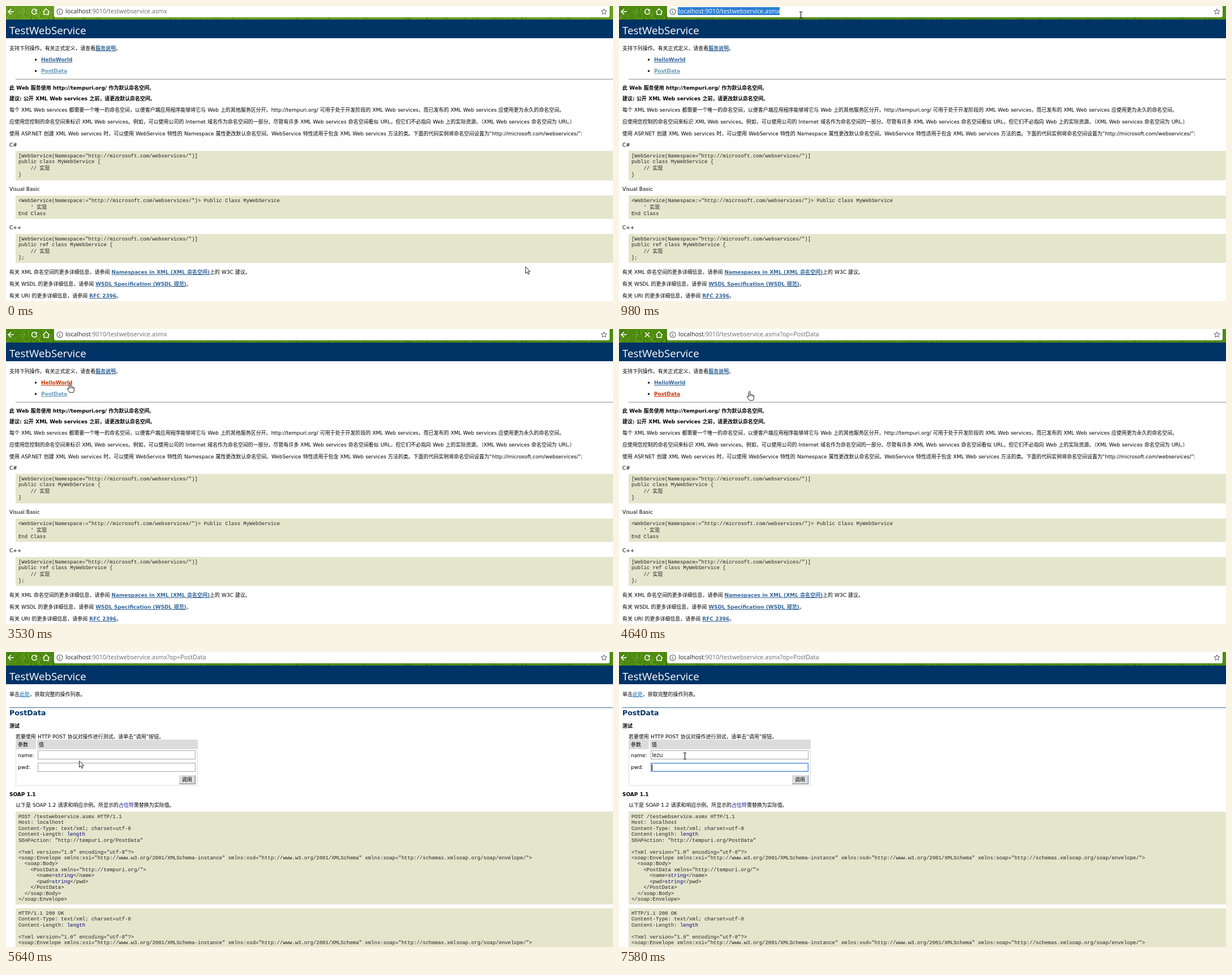
Animation of 1073 by 522 pixels, one loop 8000 ms. Source, as an HTML page with a canvas:

```html
<!DOCTYPE html>
<html lang="zh-CN">
<head>
<meta charset="utf-8">
<title>TestWebService</title>
<style>
html, body { margin: 0; width: 100%; height: 100%; overflow: hidden; background: #fff; }
canvas { display: block; }
</style>
</head>
<body>
<canvas id="stage" width="1073" height="522"></canvas>
<script>
const W = 1073, H = 522, LOOP = 8000;
const ctx = document.getElementById('stage').getContext('2d');

const SANS = "'DejaVu Sans','Noto Sans CJK SC',sans-serif";
const BODY = '8.96px ' + SANS, BOLD = 'bold ' + BODY, HEAD = 'bold 12.5px ' + SANS;
const MONO = "8.96px 'Liberation Mono','Noto Sans CJK SC',monospace";
const UI = "'Open Sans','Noto Sans',sans-serif";
const LINK = '#336699', VISITED = '#6699bb', HOVER = '#cc3300', NAVY = '#000080', HEADER = '#003366';

// Each move: first step, last step, number of steps, end position.
const MOVES = [
  [70, 130, 2, 444, 143], [280, 980, 10, 321, 16], [2230, 2610, 6, 291, 90],
  [2760, 2840, 2, 300, 80], [2915, 3070, 3, 226, 16], [3220, 3530, 5, 113, 96],
  [3605, 3760, 3, 90, 117], [4310, 4640, 5, 231, 110], [4710, 4710, 1, 231, 109],
  [5110, 5490, 6, 135, 196], [5567, 5720, 3, 116, 184]
];
const TYPED = 'lezu', KEYS = [6650, 6810, 6960, 7120];

const between = (t, a, b) => t >= a && t < b;

function rect(x, y, w, h, color) {
  ctx.fillStyle = color;
  ctx.fillRect(x, y, w, h);
}

function frame(x, y, w, h, color) {
  ctx.strokeStyle = color;
  ctx.lineWidth = 1;
  ctx.strokeRect(x + .5, y + .5, w - 1, h - 1);
}

function path(d, x, y, fill, stroke, width = 1) {
  ctx.save();
  ctx.translate(x, y);
  const p = new Path2D(d);
  if (fill) { ctx.fillStyle = fill; ctx.fill(p); }
  if (stroke) { ctx.strokeStyle = stroke; ctx.lineWidth = width; ctx.stroke(p); }
  ctx.restore();
}

// Text between ~ signs takes the mark colour; marks other than NAVY are links.
function write(s, x, y, { font = BODY, color = '#000', mark = LINK } = {}) {
  s.split('~').forEach((part, i) => {
    const marked = i % 2, link = marked && mark !== NAVY;
    ctx.font = link ? BOLD : font;
    ctx.wordSpacing = font === BODY || font === BOLD ? '.3px' : '0px';
    ctx.fillStyle = marked ? mark : color;
    ctx.fillText(part, x, y);
    const w = ctx.measureText(part).width;
    if (link) ctx.fillRect(x, y + 1, w, 1);
    x += w;
  });
  return x;
}

function code(top, height, text) {
  rect(17, top, W, height, '#e5e5cc');
  rect(17, top, W, 1, '#efefe0');
  rect(17, top + height - 1, W, 1, '#efefe0');
  let y = top + 12;
  text.split('\n').forEach((line, i) => {
    const cjk = /[\u4e00-\u9fff]/.test(line);
    if (cjk) y += 1.6;
    write(line, 22, Math.round(y), { font: MONO, color: '#222', mark: NAVY });
    y += cjk ? 10.9 : 10.43;
  });
}

function grass(focused) {
  rect(0, 0, W, 24, focused ? '#4e8c10' : '#689f20');
  let seed = 7;
  const rnd = () => (seed = seed * 16807 % 2147483647) / 2147483647;
  for (let i = 0; i < 420; i++) {
    const x = i < 160 ? rnd() * 86 : rnd() * W;
    const y = i < 160 ? rnd() * 24 : 19 + rnd() * 5;
    rect(x, y, 1 + rnd() * 2, 2 + rnd() * 5, rnd() < .5 ? 'rgba(35,85,0,.22)' : 'rgba(135,190,40,.2)');
  }
}

function toolbar(t) {
  const selected = between(t, 830, 1520);
  const loading = between(t, 1520, 1990) || between(t, 4310, 4800);
  grass(t >= 830);
  ctx.fillStyle = '#fff';
  ctx.beginPath();
  ctx.roundRect(85, -4, 982, 24, 3);
  ctx.fill();
  path('M10 0H0M5 -5L0 0L5 5', 4, 10, null, '#fff', 1.7);
  path('M0 0H10M5 -5L10 0L5 5', 24, 10, null, 'rgba(255,255,255,.16)', 1.6);
  if (loading) path('M-4 -4L4 4M4 -4L-4 4', 50, 10, null, '#fff', 1.6);
  else {
    path('M3.5 -2.8A4.5 4.5 0 1 0 4.4 1', 50, 10, null, '#fff', 1.6);
    path('M5 -5V-.5H.5Z', 50, 10, '#fff');
  }
  path('M-6 .5L0 -5L6 .5M-4 0V5H4V0', 71, 10, null, '#fff', 1.5);
  path('M5 0A5 5 0 1 1 -5 0A5 5 0 1 1 5 0M0 -1V3M0 -3V-1.8', 95, 10, null, '#555', 1.1);
  path('M0 -5L1.5 -1.7L5 -1.4L2.3 1L3.1 4.5L0 2.6L-3.1 4.5L-2.3 1L-5 -1.4L-1.5 -1.7Z', 1057, 10, null, '#555570');

  const url = { font: '10.7px ' + UI, color: selected ? '#fff' : '#222', mark: NAVY };
  if (selected) rect(104, 2, 180, 14, '#2b7fd4');
  const x = write('localhost', 105, 13, url);
  url.color = selected ? '#fff' : '#686868';
  write(':9010/testwebservice.asmx' + (t >= 4310 ? '?op=PostData' : ''), x, 13, url);

  rect(0, 24, W, 33, HEADER);
  write('TestWebService', 6, 50, { font: '18.7px ' + UI, color: '#fff' });
}

function listPage(helloHover, postHover) {
  write('支持下列操作。有关正式定义，请查看~服务说明~。', 6, 78);
  [95, 115].forEach(y => path('M1.7 0A1.7 1.7 0 1 1 -1.7 0A1.7 1.7 0 1 1 1.7 0', 52.5, y, '#000'));
  write('~HelloWorld~', 62, 98, { mark: helloHover ? HOVER : LINK });
  write('~PostData~', 62, 118, { mark: postHover ? HOVER : VISITED });
  rect(17, 129, W, 1, '#909090');
  write('此 Web 服务使用 http://tempuri.org/ 作为默认命名空间。', 6, 148, { font: BOLD });
  write('建议: 公开 XML Web services 之前，请更改默认命名空间。', 6, 167, { font: BOLD });
  write('每个 XML Web services 都需要一个唯一的命名空间，以便客户端应用程序能够将它与 Web 上的其他服务区分开。http://tempuri.org/ 可用于处于开发阶段的 XML Web services，而已发布的 XML Web services 应使用更为永久的命名空间。', 6, 187);
  write('应使用您控制的命名空间来标识 XML Web services。例如，可以使用公司的 Internet 域名作为命名空间的一部分。尽管有许多 XML Web services 命名空间看似 URL，但它们不必指向 Web 上的实际资源。（XML Web services 命名空间为 URI。）', 6, 208);
  write('使用 ASP.NET 创建 XML Web services 时，可以使用 WebService 特性的 Namespace 属性更改默认命名空间。WebService 特性适用于包含 XML Web services 方法的类。下面的代码实例将命名空间设置为“http://microsoft.com/webservices/”:', 6, 229);
  write('C#', 6, 249);
  code(256, 53, `[WebService(Namespace="http://microsoft.com/webservices/")]
public class MyWebService {
    // 实现
}`);
  write('Visual Basic', 6, 327);
  code(335, 42, `<WebService(Namespace:="http://microsoft.com/webservices/")> Public Class MyWebService
    ' 实现
End Class`);
  write('C++', 6, 395);
  code(403, 52, `[WebService(Namespace="http://microsoft.com/webservices/")]
public ref class MyWebService {
    // 实现
};`);
  write('有关 XML 命名空间的更多详细信息，请参阅 ~Namespaces in XML (XML 命名空间)~上的 W3C 建议。', 6, 474);
  write('有关 WSDL 的更多详细信息，请参阅 ~WSDL Specification (WSDL 规范)~。', 6, 495);
  write('有关 URI 的更多详细信息，请参阅 ~RFC 2396~。', 6, 516);
}

function field(y, value, focused, caret) {
  frame(56, y, 279, 16, focused ? '#4d86d8' : '#a6a6a6');
  if (focused) frame(57, y + 1, 277, 14, '#b9d0f2');
  const x = write(value, 58.5, y + 12, { font: '10px ' + UI });
  if (caret) rect(Math.round(x - .5), y + 3, 1, 11, '#000');
}

const ENVELOPE = `<?xml version="1.0" encoding="utf-8"?>
<soap:Envelope xmlns:xsi="http://www.w3.org/2001/XMLSchema-instance" xmlns:xsd="http://www.w3.org/2001/XMLSchema" xmlns:soap="http://schemas.xmlsoap.org/soap/envelope/">
  <soap:Body>`;

function formPage(t) {
  write('单击~此处~，获取完整的操作列表。', 6, 78, { mark: '#5599cc' });
  rect(6, 98, W, 1, '#406a90');
  write('PostData', 6, 112, { font: HEAD, color: HEADER });
  write('测试', 6, 134, { font: BOLD });
  write('若要使用 HTTP POST 协议对操作进行测试，请单击“调用”按钮。', 17, 153);

  frame(17, 155, 322, 82, '#dcdcdc');
  rect(17, 155, 322, 17, '#dcdcdc');
  rect(53, 155, 2, 17, '#fff');
  write('参数', 21, 167);
  write('值', 58, 167);
  write('name:', 21, 186);
  write('pwd:', 21, 207);
  const inName = between(t, 5720, 7580);
  field(174, TYPED.slice(0, KEYS.filter(k => t >= k).length), inName, inName && !between(t, 6190, 6650));
  field(196, '', t >= 7580, t >= 7580);
  rect(306, 218, 29, 16, '#dcdcdc');
  rect(306, 233, 29, 1, '#70709a');
  rect(334, 218, 1, 16, '#70709a');
  write('调用', 311, 229);

  write('SOAP 1.1', 6, 255, { font: BOLD });
  write('以下是 SOAP 1.2 请求和响应示例。所显示的~占位符~需替换为实际值。', 17, 274, { mark: NAVY });
  code(282, 165, `POST /testwebservice.asmx HTTP/1.1
Host: localhost
Content-Type: text/xml; charset=utf-8
Content-Length: ~length~
SOAPAction: "http://tempuri.org/PostData"

${ENVELOPE}
    <PostData xmlns="http://tempuri.org/">
      <name>~string~</name>
      <pwd>~string~</pwd>
    </PostData>
  </soap:Body>
</soap:Envelope>`);
  code(453, 90, `HTTP/1.1 200 OK
Content-Type: text/xml; charset=utf-8
Content-Length: ~length~

${ENVELOPE}`);
}

function pointer(t) {
  let x = 918, y = 461;
  for (const [start, end, steps, tx, ty] of MOVES) {
    if (t < start) break;
    const done = t >= end ? steps : Math.floor((t - start) / (end - start) * (steps - 1)) + 1;
    x += (tx - x) * done / steps;
    y += (ty - y) * done / steps;
  }
  return [Math.round(x), Math.round(y)];
}

function drawPointer(t, hand) {
  const [x, y] = pointer(t);
  const inField = t >= 4710 && x > 56 && x < 335 && (between(y, 175, 191) || between(y, 196, 212));
  if (hand) {
    path('M-1.5 10V1.5Q-1.5 .3 -.3 .3T1 1.5V6Q3 5 3.7 6.7Q5.3 6 5.8 7.5Q7.5 7 7.6 9V12Q7.4 14 6 16.3H-.5Q-1.5 14 -4.5 10.7Q-4.8 8.5 -3 9ZM1 6V9M3.7 6.7V9M5.8 7.5V9.5', x, y, '#fff', '#222');
  } else if (y < 21 || inField) {
    path('M-2.5 -5.5H-.5L0 -5L.5 -5.5H2.5M0 -5V5M-2.5 5.5H-.5L0 5L.5 5.5H2.5', x + .5, y, null, '#111', 1.1);
  } else {
    path('M.5 .5V12L3.2 9.5L5 13.8L6.9 13L5.1 8.9H8.6Z', x, y, '#fff', '#22223a');
  }
}

function draw() {
  const t = performance.now() % LOOP;
  const helloHover = between(t, 3530, 3605), postHover = between(t, 3682, 4710);
  rect(0, 0, W, H, '#fff');
  toolbar(t);
  if (t < 4710) listPage(helloHover, postHover);
  else formPage(t);
  drawPointer(t, helloHover || postHover);
  requestAnimationFrame(draw);
}
draw();
</script>
</body>
</html>
```
